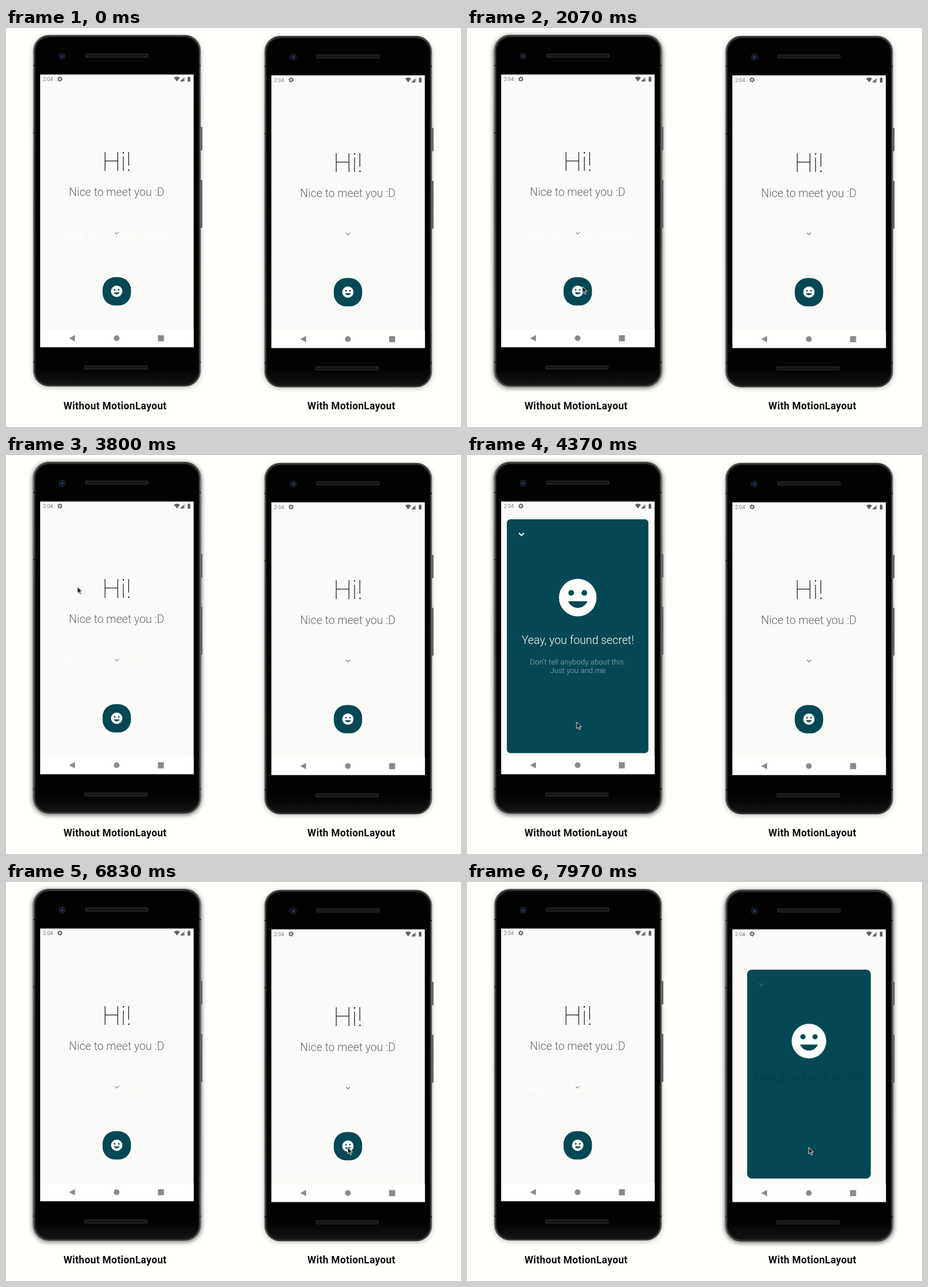
Recreate the animation shown at these times as an HTML page. Size 799 by 701 pixels, loop 8 s.

```html
<!DOCTYPE html>
<html lang="en">
<head>
<meta charset="utf-8">
<title>Without and with MotionLayout</title>
<style>
  html, body { margin: 0; width: 100%; height: 100%; overflow: hidden; background: #fffffc; }
  svg { display: block; }
  text { font-family: Roboto, sans-serif; text-anchor: middle; }

  .soft { filter: drop-shadow(0 2px 4px rgba(0, 0, 0, .25)); }
  .deep { filter: drop-shadow(0 2px 4.5px rgba(0, 0, 0, .5)); }
  .clock { font-size: 9.2px; fill: #7c7c7c; text-anchor: start; }
  .hi { font-size: 46.5px; font-weight: 100; fill: #111; }
  .nice { font-size: 19.7px; font-weight: 300; fill: #666; }
  .title { font-size: 19.7px; font-weight: 300; fill: #fff; }
  .sub { font-size: 13.4px; font-weight: 300; fill: #9bb5ba; }
  .caption { font-size: 17.5px; font-weight: 700; letter-spacing: .35px; fill: #0c0c0c; }
  .teal { fill: #034854; }
  .chevron { fill: none; stroke: #666; stroke-width: 1.1; }
  .chevron.big { stroke: #fff; stroke-width: 1.9; }

  .card, .deep, .grow, .face, .close, .secret, .cursor { animation: 8s infinite; }

  /* Left: the card simply switches on and off */
  .card { animation-name: toggle; animation-timing-function: step-end; }
  @keyframes toggle {
    0%, 43.75%, 67.875%, 100% { opacity: 0; }
    27.5%, 54.625% { opacity: 1; }
  }

  /* The phone in use casts the deeper shadow */
  .deep { animation-timing-function: step-end; }
  .deep.left { animation-name: leftShadow; }
  .deep.right { animation-name: rightShadow; }
  @keyframes leftShadow {
    0%, 93.75%, 100% { opacity: 0; }
    25.875% { opacity: 1; }
  }
  @keyframes rightShadow {
    0% { opacity: 0; }
    93.75%, 100% { opacity: 1; }
  }

  /* Right: the button grows into the card */
  .grow, .face, .close, .secret { animation-timing-function: cubic-bezier(.52, 0, .44, .69); }
  .grow { animation-name: grow; }
  @keyframes grow {
    0%, 93.5% { x: 169.6px; y: 437.8px; width: 49.8px; height: 49.8px; rx: 22px; }
    99.6%, 100% { x: 86px; y: 152.5px; width: 217px; height: 367px; rx: 8px; }
  }
  .face { animation-name: face; }
  @keyframes face {
    0%, 93.5% { transform: translate(194.4px, 462.5px) scale(1); }
    99.6%, 100% { transform: translate(194.5px, 278px) scale(3.04); }
  }
  .close { animation-name: close; }
  .close .chevron { stroke: #2a616c; }
  @keyframes close {
    0%, 93.5% { transform: translate(194.5px, 464px); opacity: 0; }
    97.5% { opacity: 0; }
    99.6%, 100% { transform: translate(111px, 178.5px); opacity: 1; }
  }
  .secret { animation-name: secret; }
  .secret text { fill: #0b3944; }
  .secret .sub { fill: #0a3f4a; }
  @keyframes secret {
    0%, 93.5% { transform: translateY(119px); opacity: 0; }
    97.5% { opacity: 0; }
    99.6%, 100% { transform: translateY(15.5px); opacity: 1; }
  }

  .cursor { animation-name: point; animation-timing-function: step-end; }
  @keyframes point {
    0% { transform: translate(75px, 11px); opacity: 0; }
    10.375% { transform: translate(75px, 11px); opacity: 1; }
    12.125% { transform: translate(183px, 361px); }
    14.125% { transform: translate(183px, 361px); animation-timing-function: steps(2, start); }
    16.625% { transform: translate(206px, 445px); }
    19.125% { transform: translate(206px, 445px); animation-timing-function: steps(2, start); }
    21.625% { transform: translate(206px, 453px); }
    24.125% { transform: translate(202.5px, 454px); }
    34.125% { transform: translate(202.5px, 454px); animation-timing-function: steps(6, start); }
    41.175% { transform: translate(98.5px, 136.5px); }
    45.375% { transform: translate(98.5px, 136.5px); animation-timing-function: steps(7, start); }
    54.125% { transform: translate(192.5px, 469px); }
    56.625% { transform: translate(192.5px, 469px); animation-timing-function: steps(3, start); }
    60.375% { transform: translate(141.5px, 247.5px); }
    62.125% { transform: translate(141.5px, 247.5px); animation-timing-function: steps(4, start); }
    67.125% { transform: translate(90.5px, 141px); }
    72.125% { transform: translate(90.5px, 141px); animation-timing-function: steps(9, start); }
    82.36% { transform: translate(592.5px, 466px); }
    84.125% { transform: translate(592.5px, 466px); animation-timing-function: steps(2, start); }
    86.625%, 100% { transform: translate(600px, 466px); opacity: 1; }
  }
</style>
</head>
<body>
<svg width="799" height="701" viewBox="0 0 799 701">
  <defs>
    <linearGradient id="rim" x2="0" y2="1">
      <stop offset="0" stop-color="#4c4c4c"/>
      <stop offset=".06" stop-color="#858585"/>
      <stop offset=".5" stop-color="#666"/>
      <stop offset=".95" stop-color="#747474"/>
      <stop offset="1" stop-color="#3a3a3a"/>
    </linearGradient>
    <linearGradient id="glass" x2="0" y2="1">
      <stop offset=".95" stop-color="#020202"/>
      <stop offset="1" stop-color="#141414"/>
    </linearGradient>

    <rect id="shell" x="47.5" y="12.2" width="294.8" height="617.6" rx="28"/>

    <g id="smiley">
      <circle r="10" fill="#fff"/>
      <g class="teal">
        <circle cx="-3.5" cy="-2.5" r="1.5"/>
        <circle cx="3.5" cy="-2.5" r="1.5"/>
        <path d="M0 5.5C2.33 5.5 4.31 4.04 5.11 2H-5.11C-4.31 4.04-2.33 5.5 0 5.5Z"/>
      </g>
    </g>

    <path id="bigChevron" class="chevron big" d="M-4.4-2.3 0 2.1 4.4-2.3"/>

    <g id="slot">
      <rect width="111" height="7" rx="2.5" fill="#2b2b2b"/>
      <rect x="1.2" y="1.2" width="108.6" height="4.6" rx="2" fill="#151515"/>
    </g>

    <g id="words">
      <text class="title" x="194.5" y="332">Yeay, you found secret!</text>
      <text class="sub" x="194.5" y="367.5">Don't tell anybody about this.</text>
      <text class="sub" x="194.5" y="382.8">Just you and me</text>
    </g>

    <g id="phone">
      <path d="M341 174h3.7v41H341zM341 267h3.7v84H341z" fill="#6a6a6a"/>
      <use class="soft" href="#shell" fill="url(#rim)"/>
      <rect x="49.3" y="13.6" width="291.2" height="614.6" rx="27" fill="#303030"/>
      <rect x="51.5" y="16" width="287" height="611" rx="25" fill="url(#glass)"/>
      <path d="M48 66h3M339 66h3M48 184h3M48 587h3M339 587h3" stroke="#1a1a1a" stroke-width="2"/>
      <use href="#slot" x="139" y="45"/>
      <use href="#slot" x="137.5" y="593"/>
      <circle cx="98.5" cy="49.5" r="6.2" fill="#1b1c20"/>
      <circle cx="98.5" cy="49.5" r="4.2" fill="#0c1428"/>
      <circle cx="98.5" cy="50" r="2" fill="#22386a"/>
      <circle cx="99.3" cy="49" r=".7" fill="#7f95bd"/>

      <rect x="60" y="81.7" width="269.5" height="479" fill="#fafbf8"/>
      <rect x="60" y="529" width="269.5" height="31.7" fill="#fffffd"/>

      <text class="clock" x="64.7" y="93.3">2:04</text>
      <g fill="none" stroke="#707070">
        <circle cx="94.6" cy="89.7" r="2.6" stroke-width="2"/>
        <circle cx="94.6" cy="89.7" r="3.9" stroke-width="1.3" stroke-dasharray="2.04 2.04"/>
      </g>
      <g fill="#5f5f5f">
        <path d="M295 87.3Q300.2 83.6 305.4 87.3L300.2 94Z"/>
        <path d="M314 85.7V94H305.7Z" opacity=".45"/>
        <path d="M312 87.7V94H305.7Z"/>
        <path d="M319 86.6h1.2v-1h2.2v1h1.2V94.3H319Z"/>
      </g>
      <g fill="#8a8a8a">
        <path d="M110.7 545 121 539.4V550.6Z"/>
        <circle cx="194.3" cy="545" r="5.1"/>
        <rect x="266.7" y="539.8" width="10.6" height="10.6" rx=".6"/>
      </g>

      <text class="hi" x="194.3" y="251.3">Hi!</text>
      <text class="nice" x="194.3" y="295">Nice to meet you :D</text>
      <path class="chevron" d="M190.9 358.3 194.5 361.9 198.1 358.3"/>
    </g>
  </defs>

  <use class="deep left" href="#shell"/>
  <use href="#phone"/>
  <text class="title" x="194.5" y="369">Yeay, you found secret!</text>
  <rect class="teal" x="169.6" y="437.8" width="49.8" height="49.8" rx="22"/>
  <use href="#smiley" transform="translate(194.4 462.5)"/>
  <g class="card">
    <rect class="teal" x="70" y="113" width="248.5" height="410.7" rx="6"/>
    <use href="#bigChevron" x="95.7" y="139.3"/>
    <use href="#smiley" transform="translate(194.5 250.5) scale(3.3)"/>
    <use href="#words"/>
  </g>

  <g transform="translate(406 1.5)">
    <use class="deep right" href="#shell"/>
    <use href="#phone"/>
    <rect class="grow teal"/>
    <g class="close"><path class="chevron big" d="M-4.4-2.3 0 2.1 4.4-2.3"/></g>
    <g class="secret">
      <text class="title" x="194.5" y="332">Yeay, you found secret!</text>
      <text class="sub" x="194.5" y="367.5">Don't tell anybody about this.</text>
      <text class="sub" x="194.5" y="382.8">Just you and me</text>
    </g>
    <g class="face"><use href="#smiley"/></g>
  </g>

  <text class="caption" x="191.5" y="669.5">Without MotionLayout</text>
  <text class="caption" x="606.5" y="669.5">With MotionLayout</text>

  <path class="cursor" d="M0 0V11.6L2.7 9.1 4.7 13.7 6.7 12.8 4.7 8.4H8.4Z" fill="#1c1c1c" stroke="#fff" stroke-width=".9"/>
</svg>
</body>
</html>
```
